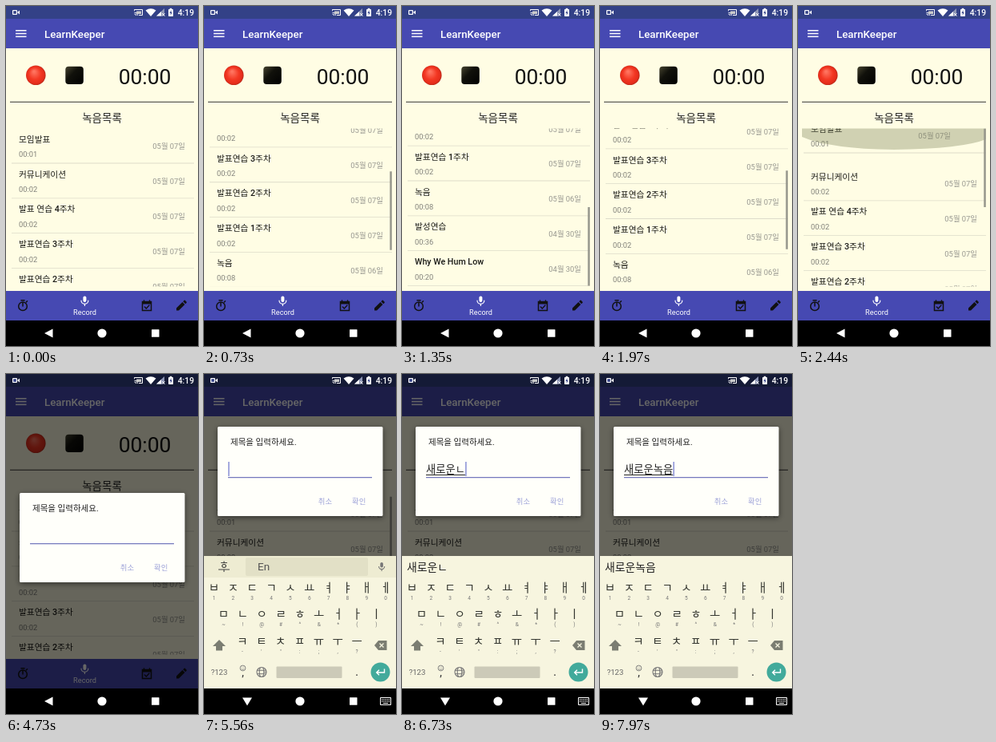
An HTML page with a canvas that plays this animation: 240 by 426 pixels, repeating every 8 s.

```html
<!DOCTYPE html>
<html lang="ko">
<head>
<meta charset="utf-8">
<title>Voice recorder</title>
<style>
html, body { margin: 0; width: 100%; height: 100%; overflow: hidden; background: #000; }
canvas { display: block; width: 240px; height: 426px; }
</style>
</head>
<body>
<canvas id="stage"></canvas>
<script>
const LOOP = 8000;
const FONT = 'Roboto, "Noto Sans CJK KR", "Noto Sans CJK", sans-serif';
const CREAM = '#fffde4', INDIGO = '#4649b2', KEYS = '#f7f5df';
const LIST = { top: 153.4, height: 198, pitch: 43.8 };
const ROWS = [
  ['모임발표', '00:01', '05월 07일'],
  ['커뮤니케이션', '00:02', '05월 07일'],
  ['발표 연습 4주차', '00:02', '05월 07일'],
  ['발표연습 3주차', '00:02', '05월 07일'],
  ['발표연습 2주차', '00:02', '05월 07일'],
  ['발표연습 1주차', '00:02', '05월 07일'],
  ['녹음', '00:08', '05월 06일'],
  ['발성연습', '00:36', '04월 30일'],
  ['Why We Hum Low', '00:20', '04월 30일']
];
const KEY_ROWS = [
  { keys: 'ㅂㅈㄷㄱㅅㅛㅕㅑㅐㅔ', hints: '1234567890', x: 12.5, y: 268 },
  { keys: 'ㅁㄴㅇㄹㅎㅗㅓㅏㅣ', hints: '~!@#^&*()', x: 24.5, y: 301 },
  { keys: 'ㅋㅌㅊㅍㅠㅜㅡ', hints: '-\'":;,?', x: 48, y: 335 }
];
const TYPING = ['', ...'ㅅ 새 샐 새로 새롱 새로우 새로운 새로운ㄴ 새로운노 새로운녹 새로운녹ㅇ 새로운녹으 새로운녹음'.split(' ')];

const canvas = document.getElementById('stage');
const ctx = canvas.getContext('2d');
const ratio = window.devicePixelRatio || 1;
canvas.width = 240 * ratio;
canvas.height = 426 * ratio;

const clamp = v => Math.max(0, Math.min(1, v));
const ramp = (t, from, to) => clamp((t - from) / (to - from));
const smooth = p => p * p * (3 - 2 * p);
const easeOut = p => 1 - (1 - p) ** 3;
const pulse = (t, a, b, c, d) => ramp(t, a, b) * (1 - ramp(t, c, d));

function rect(x, y, w, h, color, radius = 0) {
  ctx.fillStyle = color;
  ctx.beginPath();
  ctx.roundRect(x, y, w, h, radius);
  ctx.fill();
}

function disc(x, y, r, color) {
  ctx.fillStyle = color;
  ctx.beginPath();
  ctx.arc(x, y, r, 0, 7);
  ctx.fill();
}

function text(str, x, y, size, color, align = 'left', weight = 400) {
  ctx.font = `${weight} ${size}px ${FONT}`;
  ctx.textAlign = align;
  ctx.fillStyle = color;
  ctx.fillText(str, x, y);
}

function fillPath(d, color) {
  ctx.fillStyle = color;
  ctx.fill(new Path2D(d));
}

function strokePath(d, color, width = 1) {
  ctx.strokeStyle = color;
  ctx.lineWidth = width;
  ctx.stroke(new Path2D(d));
}

function withAlpha(alpha, draw) {
  if (alpha <= 0) return;
  ctx.save();
  ctx.globalAlpha = alpha;
  draw();
  ctx.restore();
}

function drawStatusIcons() {
  rect(8, 5, 6, 6, '#fff', 1);
  rect(9.2, 6.2, 3.6, 3.6, '#334187');
  fillPath('M14 8L17 5.5V10.5Z', '#fff');
  strokePath('M160.5 6V4.5H170.5V11.5H166 M160.5 8A4 4 0 0 1 164.5 12 M160.5 10A2 2 0 0 1 162.5 12', '#fff');
  rect(163, 6.5, 6, 3.5, '#ccc');
  fillPath('M174.5 5.5Q181 1 187.5 5.5L181 13Z', '#fff');
  fillPath('M188 12.5L198 3V12.5Z', '#8e96b5');
  fillPath('M188 12.5L194 7V12.5Z', '#fff');
  strokePath('M195 9L198.5 12.5M198.5 9L195 12.5', '#fff');
  rect(203, 4, 6, 9, '#fff', 0.8);
  rect(204.7, 2.8, 2.6, 2, '#fff');
  fillPath('M206.6 5L204.4 9H206L205.5 12L207.8 7.8H206.3Z', '#334187');
  text('4:19', 235, 12, 10.3, '#fff', 'right', 500);
}

function drawHeader() {
  rect(0, 0, 240, 16, '#334187');
  rect(0, 16, 240, 37, INDIGO);
  for (const y of [30, 33.8, 37.6]) rect(12, y, 13.5, 1.5, '#fff');
  text('LearnKeeper', 48, 39.7, 13.3, '#fff', 'left', 500);

  const red = ctx.createRadialGradient(35, 82, 1, 37, 87, 13);
  red.addColorStop(0, '#ff7460');
  red.addColorStop(0.55, '#f33823');
  red.addColorStop(0.84, '#e52d1b');
  red.addColorStop(1, '#ab2a1b');
  disc(37.3, 86.7, 12.3, red);
  const black = ctx.createLinearGradient(74, 76, 97, 98);
  black.addColorStop(0, '#46442f');
  black.addColorStop(0.4, '#11110b');
  black.addColorStop(1, '#000');
  rect(74.3, 75.7, 22.5, 22.3, black, 4);
  text('00:00', 173.5, 97.5, 26.4, '#111', 'center');
  rect(5, 119.7, 230, 1, '#333');
  text('녹음목록', 120, 144.5, 13.5, '#222', 'center');
}

function drawList(t) {
  const { top, height, pitch } = LIST;
  const scroll = 197 * (smooth(ramp(t, 200, 1200)) - smooth(ramp(t, 1600, 2380)));
  const pull = pulse(t, 2340, 2420, 2480, 2800);
  ctx.save();
  ctx.beginPath();
  ctx.rect(5, top, 231, height);
  ctx.clip();
  ROWS.forEach(([title, length, date], i) => {
    const y = top + i * pitch - scroll + (i ? 3 : -13) * pull;
    text(title, 16, y + 17.4, 10.7, '#1b1b18', 'left', 500);
    text(length, 16, y + 35.8, 9.3, '#80807a');
    text(date, 224 - (i ? 0 : 33 * pull), y + 26, 9.4, '#96968f', 'right');
    rect(7, y + pitch - 0.6, 228, 0.8, '#dddcca');
  });
  withAlpha(pull, () => fillPath('M5 153H235V167Q205 179 120 180Q40 179 5 164Z', 'rgba(125,130,90,.36)'));
  const barAlpha = Math.max(pulse(t, 180, 260, 2700, 3000), pulse(t, 5050, 5200, 5700, 5950));
  withAlpha(barAlpha, () => rect(232.3, top + scroll / 2, 2.5, 98.5, '#96968c'));
  ctx.restore();
}

function drawTabs() {
  rect(0, 357, 240, 37, INDIGO);
  ctx.lineCap = 'round';
  strokePath('M21 371.5V376M19 368.7H23M25.3 371L26.5 369.8', '#111', 1.5);
  ctx.strokeStyle = '#111';
  ctx.beginPath();
  ctx.arc(21, 376.2, 5.3, 0, 7);
  ctx.stroke();
  rect(96.4, 363.5, 4, 7.5, '#fff', 2);
  strokePath('M94 369A4.4 4.4 0 0 0 102.8 369M98.4 373.5V375.5', '#fff', 1.2);
  text('Record', 98.5, 387.4, 9.2, '#fff', 'center');
  strokePath('M170.5 370.5H181.5V381.5H170.5ZM172.5 369V371M179.5 369V371', '#111', 1.5);
  rect(170, 370, 12, 3.5, '#111');
  strokePath('M173.3 377L175.3 379L179 375', '#111', 1.3);
  fillPath('M213 378.5L220.5 371L223.5 374L216 381.5H213ZM221.3 370.2L222.8 368.8Q223.3 368.4 223.8 368.8L225.7 370.7Q226.1 371.2 225.7 371.7L224.3 373.2Z', '#111');
  ctx.lineCap = 'butt';
}

function drawNavigation(keyboardOpen) {
  rect(0, 394, 240, 32, '#000');
  fillPath(keyboardOpen ? 'M48 405.5H60L54 415.5Z' : 'M48 410L58.5 404.5V415.5Z', '#fff');
  disc(120, 410, 5.6, '#fff');
  rect(182, 405.3, 9.5, 9.5, '#fff', 0.5);
  if (!keyboardOpen) return;
  strokePath('M220.5 405.5H233.5V414.5H220.5Z', '#fff');
  for (let i = 0; i < 10; i++) rect(222 + (i % 5) * 2.2, 407.2 + (i > 4) * 2.3, 1.2, 1.2, '#fff');
  rect(224, 412, 6, 1, '#fff');
}

function drawDialog(y, typed, cursor) {
  ctx.save();
  ctx.shadowColor = 'rgba(0,0,0,.5)';
  ctx.shadowBlur = 7 * ratio;
  ctx.shadowOffsetY = 2 * ratio;
  rect(17, y, 206.5, 112, '#fffffa', 1.5);
  ctx.restore();
  text('제목을 입력하세요.', 33, y + 23, 10.5, '#222');
  rect(30, y + 63, 180, 1.2, '#7478bd');
  text(typed, 30, y + 58, 13.3, '#222');
  const width = ctx.measureText(typed).width;
  if (typed) rect(30, y + 60, width, 1, '#222');
  if (cursor) rect(30.3 + width, y + 44, 1.4, 18, '#7f86d2');
  text('취소', 151.5, y + 96.5, 9.4, '#9da2d8', 'center');
  text('확인', 193.7, y + 96.5, 9.4, '#9da2d8', 'center');
}

function drawToolbar(typed) {
  if (typed) {
    text(typed, 6, 246.5, 13.9, '#222');
    return;
  }
  rect(0, 228, 240, 27, '#eeecd2');
  rect(52, 230, 153, 23, '#e2e0c6', 2);
  text('ㅎ', 25, 243, 13, '#333', 'center');
  strokePath('M18 245H32M25 245V248', '#444', 1.1);
  text('En', 67, 246, 13.5, '#555');
  rect(220.3, 236, 3.6, 6.5, '#777', 1.8);
  strokePath('M218.5 241A3.6 3.6 0 0 0 225.7 241M222.1 244.5V247', '#777', 1.1);
}

function drawKeyboard(offset, typed) {
  ctx.save();
  ctx.beginPath();
  ctx.rect(0, 0, 240, 394);
  ctx.clip();
  ctx.translate(0, offset);
  rect(0, 228, 240, 166, KEYS);
  drawToolbar(typed);
  for (const { keys, hints, x, y } of KEY_ROWS) {
    [...keys].forEach((key, i) => {
      const cx = x + i * 23.85;
      text(key, cx, y + 5.3, 14.5, '#33352f', 'center');
      text(hints[i], cx, y + 15.2, 6.5, '#777', 'center');
    });
  }
  fillPath('M19 333L27 341H23V346.5H15V341H11Z', '#7b7d72');
  fillPath('M213 340L218 334H228.5V346H218Z', '#7b7d72');
  strokePath('M219.5 337.5L224.5 342.5M224.5 337.5L219.5 342.5', KEYS, 1.3);
  text('?123', 19, 377, 9.6, '#666', 'center');
  ctx.strokeStyle = '#777';
  ctx.lineWidth = 0.9;
  ctx.beginPath();
  ctx.arc(48.5, 368.5, 3.4, 0, 7);
  ctx.stroke();
  strokePath('M46.7 369.3Q48.5 371.5 50.3 369.3M47 367.2H47.8M49.2 367.2H50', '#777', 0.8);
  text(',', 48.5, 379, 12, '#333', 'center', 500);
  ctx.lineWidth = 1.1;
  ctx.beginPath();
  ctx.arc(72, 373.5, 6, 0, 7);
  ctx.ellipse(72, 373.5, 2.8, 6, 0, 0, 7);
  ctx.stroke();
  strokePath('M66.5 371.3H77.5M66.5 375.7H77.5', '#777', 1);
  rect(90.5, 366.5, 82, 14.5, '#cccab8', 1);
  text('.', 191, 378, 13, '#333', 'center', 500);
  disc(220.5, 373.5, 12, '#42aa9b');
  strokePath('M225.5 369.5V374H215.8M219 370.7L215.7 374L219 377.3', '#fff', 1.4);
  ctx.restore();
}

function render(t) {
  ctx.setTransform(ratio, 0, 0, ratio, 0, 0);
  rect(0, 0, 240, 426, CREAM);
  drawHeader();
  drawList(t);
  drawTabs();

  const shown = smooth(ramp(t, 3950, 4130));
  const raised = easeOut(ramp(t, 4990, 5260));
  const step = t < 5750 ? 0 : Math.min(TYPING.length - 1, 1 + Math.floor((t - 5750) / 130));
  const typed = TYPING[step];

  withAlpha(shown * 0.6, () => rect(0, 0, 240, 394, '#000'));
  drawStatusIcons();
  withAlpha(shown, () => drawDialog(149 - 83 * raised, typed, raised > 0));
  if (raised > 0) drawKeyboard(166 * (1 - raised), typed);
  drawNavigation(raised > 0);
}

function frame(now) {
  render(now % LOOP);
  requestAnimationFrame(frame);
}
requestAnimationFrame(frame);
</script>
</body>
</html>
```
